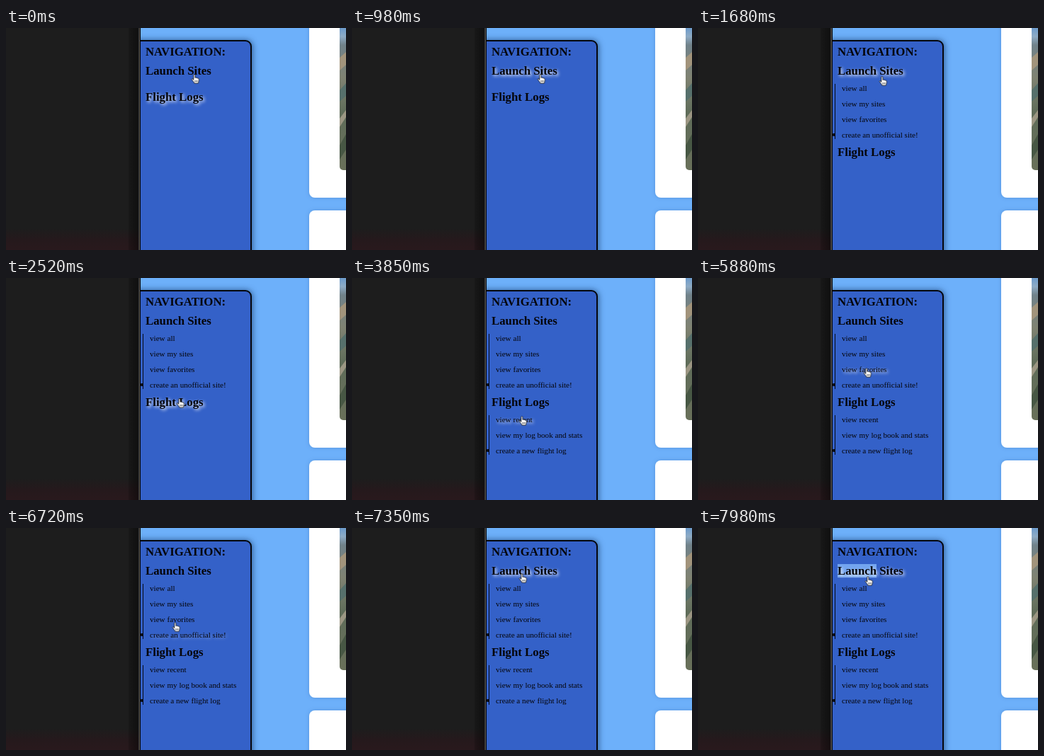
An HTML page for the animation above (8 s loop, 480 px wide and 314 px high).

```html
<!DOCTYPE html>
<html lang="en">
<head>
<meta charset="utf-8">
<title>Navigation menu</title>
<style>
@property --glow { syntax: "<number>"; inherits: true; initial-value: 0; }

html, body { margin: 0; width: 100%; height: 100%; overflow: hidden; }
body { background: #6db0fa; }
.stage { position: relative; width: 480px; height: 314px; overflow: hidden; color: #050509;
  font-family: "Liberation Serif", "Times New Roman", serif; }
.stage div, .stage svg { position: absolute; }

/* Page behind the menu */
.card { left: 428px; width: 80px; background: #fff; box-shadow: 0 0 5px #3f78bd80; }
.card.upper { top: -20px; height: 260px; border-radius: 8px; }
.card.lower { top: 258px; height: 80px; border-radius: 8px; }
.photo { left: 471px; top: 0; }
.menu { left: 170px; top: 17px; width: 173px; height: 320px; background: #3461c8;
  border: 2px solid #05070d; border-radius: 9px; box-shadow: 1px 0 9px #10305fb0; }

/* Dark window on the left */
.window { left: 0; top: 0; width: 190px; height: 314px;
  background:
    linear-gradient(90deg, transparent 172px, #0003 174px, #0007 187px, #555 188px, #555 189px, #000 189px),
    linear-gradient(#1d1d1d 284px, #25191c 300px, #29191d); }

/* Menu text */
.head { left: 197px; font: bold 16.8px/20px "Liberation Serif", "Times New Roman", serif; white-space: nowrap; }
.glow { text-shadow: 2px 2px 4px rgb(255 255 255 / var(--glow)); }
.list { left: 190px; width: 150px; }
.list::before { content: ""; position: absolute; left: 3px; top: 0; width: 1px; height: 100%; background: #080c18; }
.list::after { content: ""; position: absolute; left: 0; bottom: 4px; width: 4px; height: 4px; border-radius: 1px; background: #080c18; }
.item { left: 13px; top: calc(var(--row) * 22px - 4.8px); font-size: 11.15px; line-height: 22px; white-space: nowrap; }
.logs { left: 0; top: 0; }

.anim { animation: 8s linear infinite; }
.cursor { left: 0; top: 0; overflow: visible; animation-name: point; animation-timing-function: ease-in-out; }
.sites-list { animation-name: sites-list; }
.logs { animation-name: shift; }
.logs-list { animation-name: logs-list; }
.sites { animation-name: hover-sites; }
.flights { animation-name: hover-flights; }
.mark { animation-name: select; }
.mine { animation-name: hover-mine; }
.faves { animation-name: hover-faves; }
.create { animation-name: hover-create; }
.recent { animation-name: hover-recent; }
.book { animation-name: hover-book; }

@keyframes point {
  0%, 19.25% { transform: translate(261.3px, 65px); }
  21% { transform: translate(255.3px, 68px); }
  28.9%, 38.5% { transform: translate(240.3px, 170px); }
  43.1% { transform: translate(237px, 226px); }
  48.1%, 49% { transform: translate(235.3px, 195px); }
  53.7% { transform: translate(234px, 102px); }
  58.6% { transform: translate(236px, 205px); }
  60.4%, 69.1% { transform: translate(240px, 280px); }
  73.5%, 78.75% { transform: translate(233.3px, 127px); }
  82.2% { transform: translate(234px, 148px); }
  88.4%, 91.95% { transform: translate(235.3px, 64px); }
  92.7%, 100% { transform: translate(235.3px, 68px); }
}

/* Lists fade in after the layout has opened, and close at once */
@keyframes sites-list {
  0%, 13% { opacity: 0; }
  15.75%, 92.6% { opacity: 1; }
  92.7%, 95.8% { opacity: 0; }
  99%, 100% { opacity: 1; }
}
@keyframes shift {
  0%, 12.4% { transform: translateY(-78px); }
  13.6%, 92.3% { transform: none; }
  92.7%, 95.4% { transform: translateY(-78px); }
  96.6%, 100% { transform: none; }
}
@keyframes logs-list {
  0%, 32% { opacity: 0; }
  35%, 100% { opacity: 1; }
}
@keyframes select {
  0%, 95.3% { background-color: #73a5ef00; }
  95.4%, 100% { background-color: #73a5ef; }
}

/* Hover glows */
@keyframes hover-sites {
  0%, .88% { --glow: 0; }
  4.4%, 22.5% { --glow: .95; }
  26%, 87.5% { --glow: 0; }
  91%, 100% { --glow: .95; }
}
@keyframes hover-flights {
  0%, .88% { --glow: .9; }
  4.4%, 27.5% { --glow: 0; }
  31%, 39.5% { --glow: .95; }
  43%, 100% { --glow: 0; }
}
@keyframes hover-recent {
  0%, 40.3% { --glow: 0; }
  41.5% { --glow: .4; }
  44%, 45.5% { --glow: 0; }
  48.1%, 49.4% { --glow: .9; }
  52%, 57.5% { --glow: 0; }
  58.8% { --glow: .5; }
  61%, 100% { --glow: 0; }
}
@keyframes hover-book {
  0%, 41.4% { --glow: 0; }
  43.5%, 45.5% { --glow: .8; }
  48.1%, 100% { --glow: 0; }
}
@keyframes hover-create {
  0%, 50% { --glow: 0; }
  51% { --glow: .4; }
  53%, 80.5% { --glow: 0; }
  82.5% { --glow: .7; }
  85.5%, 100% { --glow: 0; }
}
@keyframes hover-faves {
  0%, 51% { --glow: 0; }
  52% { --glow: .4; }
  54.5%, 71.5% { --glow: 0; }
  73.5%, 80.5% { --glow: .95; }
  83.5%, 100% { --glow: 0; }
}
@keyframes hover-mine {
  0%, 52% { --glow: 0; }
  54% { --glow: .7; }
  57%, 85.5% { --glow: 0; }
  86.5% { --glow: .3; }
  89%, 100% { --glow: 0; }
}
</style>
</head>
<body>
<div class="stage">
  <div class="menu"></div>
  <div class="card upper"></div>
  <div class="card lower"></div>
  <svg class="photo" width="9" height="201">
    <defs>
      <clipPath id="frame"><rect y="-10" width="30" height="211" rx="5"/></clipPath>
      <linearGradient id="land" x2="0" y2="1">
        <stop offset="0" stop-color="#6d9bcb"/>
        <stop offset=".06" stop-color="#8eabc5"/>
        <stop offset=".12" stop-color="#71828a"/>
        <stop offset=".35" stop-color="#7f8272"/>
        <stop offset=".6" stop-color="#5f6c59"/>
        <stop offset="1" stop-color="#69705a"/>
      </linearGradient>
    </defs>
    <g clip-path="url(#frame)">
      <rect width="9" height="201" fill="url(#land)"/>
      <path d="M0 42 9 34V52L0 60Z" fill="#a2947c"/>
      <path d="M0 88 9 78V96L0 104Z" fill="#56706c"/>
      <path d="M0 128 9 116V126L0 140Z" fill="#9c9683"/>
      <path d="M0 166 9 150V172L0 186Z" fill="#475744"/>
    </g>
  </svg>
  <div class="window"></div>

  <div class="head" style="top:23.6px">NAVIGATION:</div>
  <div class="head glow sites anim" style="top:51px"><span class="mark anim">Launch</span> Sites</div>
  <div class="list sites-list anim" style="top:79px;height:78px">
    <div class="item" style="--row:0">view all</div>
    <div class="item glow mine anim" style="--row:1">view my sites</div>
    <div class="item glow faves anim" style="--row:2">view favorites</div>
    <div class="item glow create anim" style="--row:3">create an unofficial site!</div>
  </div>
  <div class="logs anim">
    <div class="head glow flights anim" style="top:165.7px">Flight Logs</div>
    <div class="list logs-list anim" style="top:194px;height:56px">
      <div class="item glow recent anim" style="--row:0">view recent</div>
      <div class="item glow book anim" style="--row:1">view my log book and stats</div>
      <div class="item" style="--row:2">create a new flight log</div>
    </div>
  </div>

  <svg class="cursor anim" width="12" height="15" stroke="#111" stroke-width=".8" stroke-linejoin="round">
    <path fill="#fff" d="M3.5 8.4V1.8a1.1 1.1 0 0 1 2.2 0V5.5c.3-.7 1.8-.6 2 .3.4-.5 1.6-.3 1.8.5.5-.3 1.5-.1 1.5 1V9.5c0 1.5-.8 2-1 3.7H4.6C4.2 11.5 2.3 9.8 1 7.8.5 6.6 2 6.3 2.6 7.2Z"/>
    <path fill="none" stroke-width=".6" d="M5.6 9v2.6M7.2 9v2.6M8.8 9v2.6"/>
  </svg>
</div>
</body>
</html>
```
